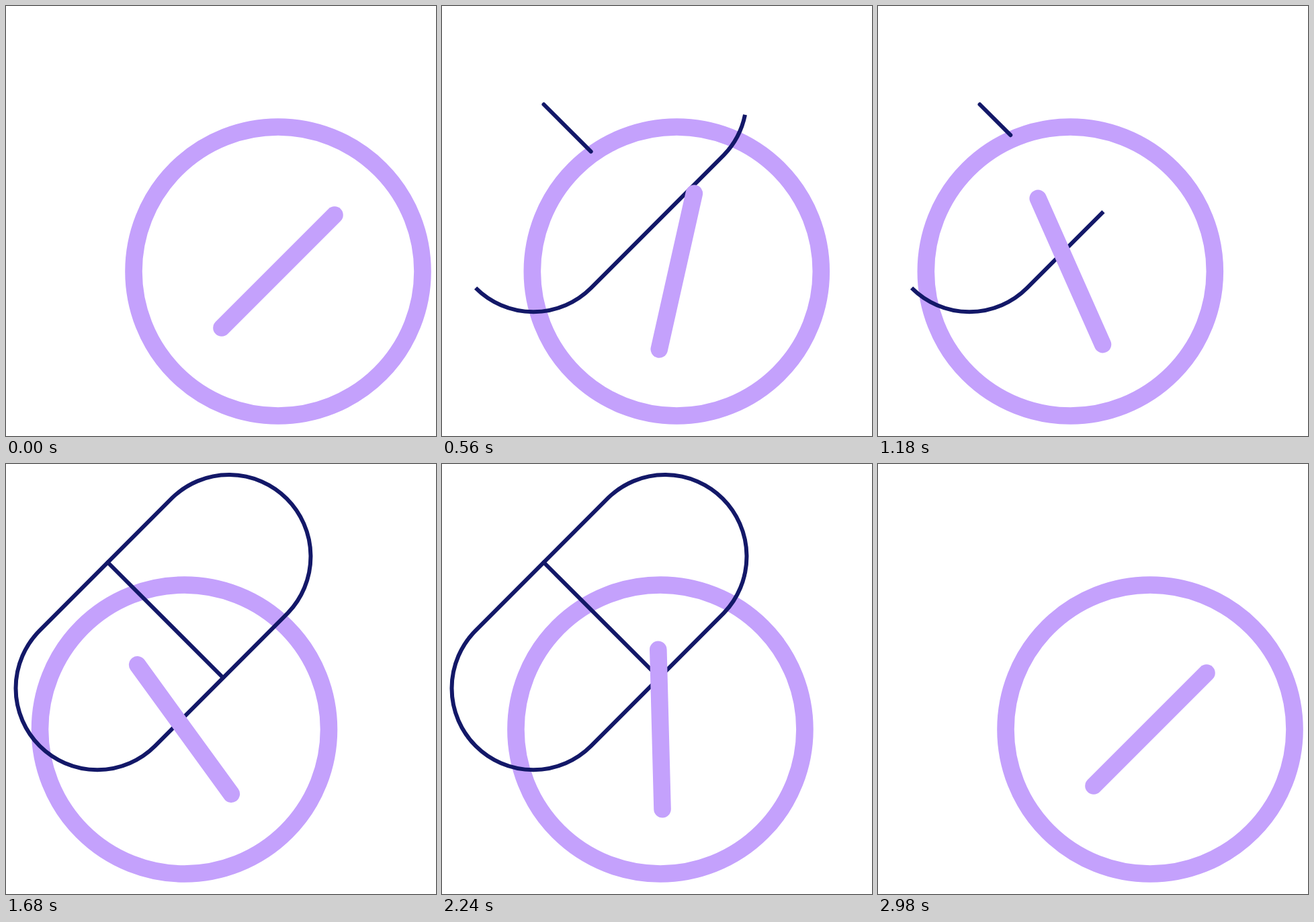
Recreate the animation shown at these times as an HTML page. Size 640 px wide and 640 px high, loop 3000 ms.

```html
<!DOCTYPE html>
<html lang="en">
<head>
<meta charset="utf-8">
<title>Pill and dial</title>
<style>
  /* Step counter: 125 steps of 24 ms drive every part */
  @property --k {
    syntax: "<number>";
    inherits: true;
    initial-value: 0;
  }
  @keyframes count {
    from { --k: 0; }
    to { --k: 125; }
  }
  html {
    animation: count 3s steps(125) -8ms infinite;
  }
  html, body {
    margin: 0;
    width: 100%;
    height: 100%;
    overflow: hidden;
    background: #fff;
  }
  svg {
    display: block;
    width: 100%;
    height: 100%;
    fill: none;

    /* Dial: 0 at the right, 1 at the left */
    --turn: max(0, min(var(--k) / 64, (124 - var(--k)) / 60));

    /* Visible part of the pill lines, 0 to 1 */
    --tail: clamp(0, 1 - var(--k) / 23, 1);
    --leave: clamp(0, (32 - var(--k)) / 22, 1);
    --grow: clamp(0, (var(--k) - 43) / 22.5, 1);
    --shrink: clamp(0, (122 - var(--k)) / 22, 1);
    --head: max(var(--leave), min(var(--grow), var(--shrink)));
    --span: max(0, var(--head) - var(--tail));
  }
  .dial {
    stroke: #c4a1fc;
    stroke-width: 25.6px;
    stroke-linecap: round;
    transform: translate(calc(405px - 155px * var(--turn)), 395px);
  }
  .hand {
    transform: rotate(calc(45deg - 90deg * var(--turn)));
  }
  .pill {
    stroke: #131868;
    stroke-width: 6px;
    stroke-dasharray: calc(100px * var(--span)) 200px;
    stroke-dashoffset: calc(-100px * var(--tail));
    opacity: calc(1000 * var(--span));
  }
  .seam {
    stroke-linecap: round;
  }
</style>
</head>
<body>
<svg viewBox="0 0 640 640">
  <g class="dial"><circle r="215"/></g>
  <g class="pill">
    <path pathLength="100" d="M50.1 419.7A121.5 121.5 0 0 0 221.9 419.7L419.4 221.9A121.5 121.5 0 0 0 247.6 50.1L50.1 247.9A121.5 121.5 0 0 0 50.1 419.7"/>
    <line class="seam" pathLength="100" x1="151.5" y1="146.5" x2="323" y2="318"/>
  </g>
  <g class="dial"><line class="hand" y1="-118.8" y2="118.8"/></g>
</svg>
</body>
</html>
```
